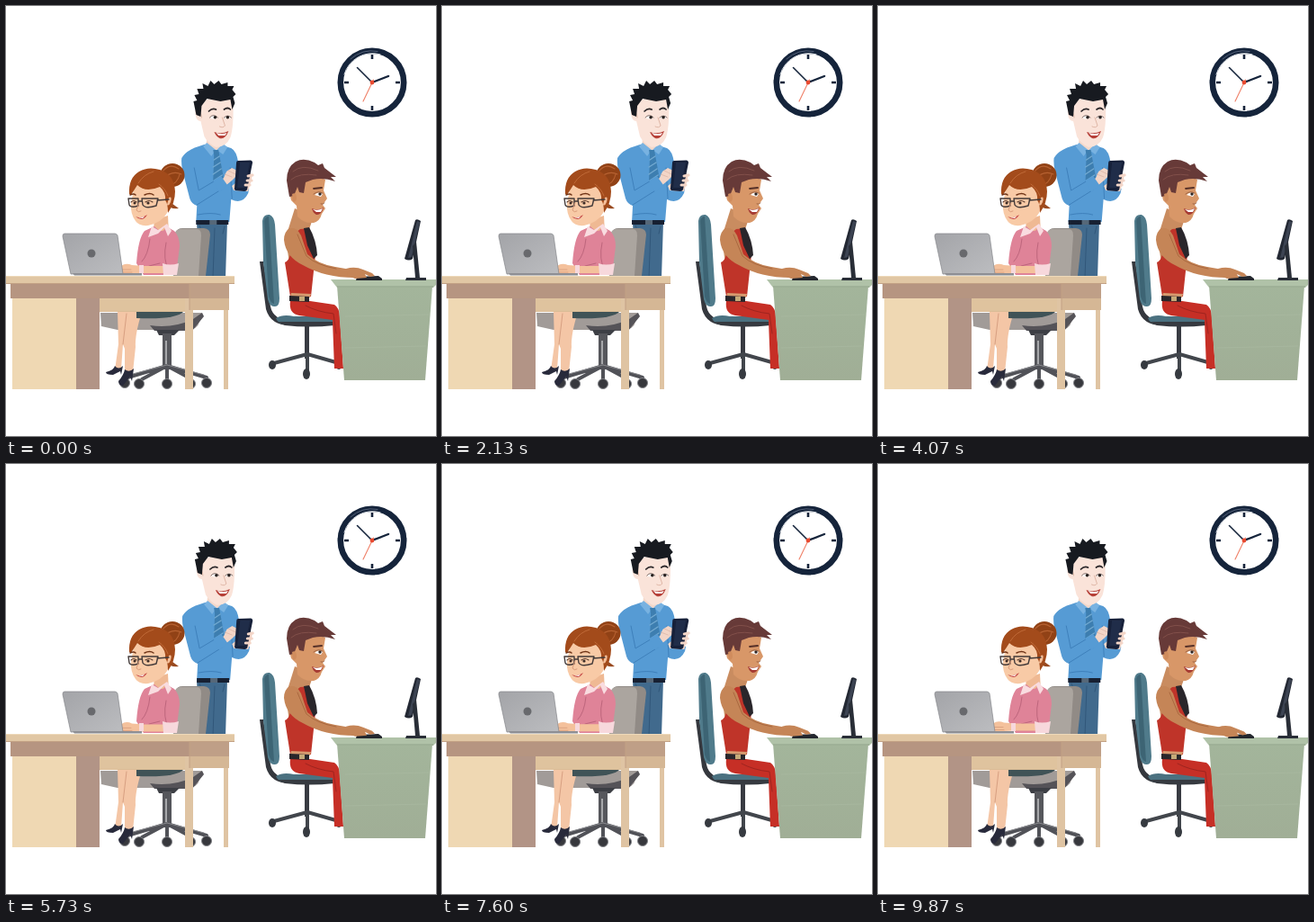
Write an HTML page that moves like this. It is 478x478 px and loops after 9940 ms.

```html
<!DOCTYPE html>
<html lang="en">
<head>
<meta charset="utf-8">
<title>Office at work</title>
<style>
html, body { margin: 0; width: 100%; height: 100%; overflow: hidden; background: #fff }
svg { display: block; width: 100vw; height: 100vh }
.line { fill: none; stroke-linecap: round; stroke-linejoin: round }
</style>
</head>
<body>
<svg viewBox="0 0 478 478">
<defs>
  <linearGradient id="green" x2="0" y2="1"><stop stop-color="#a3b59b"/><stop offset="1" stop-color="#a0ae96"/></linearGradient>
  <linearGradient id="metal" x2="1" y2="1"><stop stop-color="#a3a4a8"/><stop offset="1" stop-color="#bcbdc0"/></linearGradient>
</defs>

<g id="clock" class="line">
  <circle cx="407" cy="85" r="35.2" fill="#fff" stroke="#15243b" stroke-width="6.6"/>
  <path d="M376 76A32.5 32.5 0 0 1 416 53.8" stroke="#dfe3e8" stroke-width="1"/>
  <path d="M383 59A35 35 0 0 1 413 50.5" stroke="#536078" stroke-width="1"/>
  <path d="M407 54v5M407 111v5M376 85h5M433 85h5" stroke="#15243b" stroke-width="2.6" stroke-linecap="butt"/>
  <path d="M407 85L425 78" stroke="#15243b" stroke-width="2.4"/>
  <path d="M407 85L390.500 68.500" stroke="#15243b" stroke-width="1.6"/>
  <path d="M408.500 82L397 106" stroke="#ef8068" stroke-width="1.1"/>
  <circle cx="407" cy="85" r="2.4" fill="#e8492f"/>
</g>

<g id="standing">
  <path d="M212 240H246L244 302H215Z" fill="#416a8d"/>
  <path d="M232 247L230 302M215 244l3 8M243 245l-2 8" class="line" stroke="#31577a"/>
  <g id="torso">
    <path d="M225 153Q201 158 195 169Q194 175 197 187L204 214Q206 220 212 222L211 240H248L250 215Q263 221 269 208L270 203L257 201L258 174Q256 161 250 158L240 155Z" fill="#569bd4"/>
    <path d="M209 180L214 205L234 193M212 221L239 204M249 180L251 214M213 232Q228 229 238 232" class="line" stroke="#3e80bb" stroke-width="1"/>
    <path d="M223 147L241 149L241 159L233 163L222 156Z" fill="#f4d8ca"/>
    <path d="M223 152L233 160L228 167L219 156ZM241 153L234 160L241 165L246 157Z" fill="#78b2e1"/>
    <path d="M230 160L236 160L237 166L242 193L237 201L230 194L231 166Z" fill="#3d7eb0"/>
    <path d="M231 171l6-4M230 179l8-5M230 187l9-6M231 194l9-6" class="line" stroke="#73aad1" stroke-width="1.4"/>
    <path d="M211 238H247V243H211Z" fill="#172032"/>
    <path d="M226 238h8v5h-8z" fill="#566879"/>
  </g>
  <g id="phone">
    <path d="M270 184Q275 187 272 196L269 206L253 205L251 200L260 193Z" fill="#f3d5c7"/>
    <path d="M235 197L242 191L245 184L251 180L259 184L256 189L251 194L240 203Z" fill="#f3d5c7"/>
    <path d="M230 194L239 189L246 199L237 207Z" fill="#569bd4"/>
    <path d="M243 187l8 3M247 183l8 4" class="line" stroke="#d8b2a3" stroke-width=".7"/>
    <path d="M258 172L272 171.500Q274 172 274 174L268 204Q267 206 265 206L255 205Q253 204 254 202L256 174Q256 172 258 172Z" fill="#17213a"/>
    <path d="M260 174L271 174L265 202L257 202Z" fill="#202d49"/>
    <path d="M269 189l5-1M268 194l5 0M266 199l5 0" class="line" stroke="#f3d5c7" stroke-width="3"/>
  </g>
  <g id="head">
    <path d="M214 114Q209 113 210 120Q211 128 216 128L220 145Q224 153 233 157Q244 157 249 146Q253 134 252 105L244 100L222 104Z" fill="#fae3d9"/>
    <path d="M213 117q4 1 4 7" class="line" stroke="#dfb8a7"/>
    <path d="M211 121L208 106L212 105L209 99L214 98L212 92L219 92L218 86L224 89L227 83L231 87L236 83L239 87L246 85L246 89L253 89L251 93L255 98L252 101L254 108L251 115L249 104L238 106L223 103L217 111L216 123Z" fill="#171a20"/>
    <path d="M225 117q4-4 8-2M242 115q4-3 7 0" class="line" stroke="#292528" stroke-width="1.7"/>
    <g id="eyesOpen">
      <path d="M226 124Q230 119 235 124Q230 127 226 124M242 124Q246 119 250 124Q246 126 242 124" fill="#fff"/>
      <path d="M226 124q4-5 9 0M242 124q4-4 8 0" class="line" stroke="#5d4843" stroke-width=".8"/>
      <circle cx="232" cy="123.800" r="1.800" fill="#28211f"/><circle cx="246" cy="123.800" r="1.800" fill="#28211f"/>
    </g>
    <path id="eyesShut" d="M226 124q4 3 9 0M242 124q4 3 8 0" class="line" stroke="#6c4b43" stroke-width="1.1"/>
    <path d="M240 124L243 133Q241 136 237 134" class="line" stroke="#dfb6a6" stroke-width="1"/>
    <path d="M231 140Q239 143 247 139Q243 149 237 147Q233 145 231 140" fill="#b64038"/>
    <path d="M233 141Q240 143 245 141L243 144H236Z" fill="#fff"/>
  </g>
</g>

<g id="chairLeft">
  <path d="M189 252Q190 247 196 247H220Q227 248 227 254L222 300H188Z" fill="#918b86"/>
  <path d="M187 255Q188 248 194 248H212Q217 248 217 255L214 300H186Z" fill="#aba59f"/>
  <path d="M105 341H218L215 351Q213 360 201 360H124L106 356Z" fill="#a19b98"/>
  <path d="M160 355Q185 359 208 348L218 341L220 345L207 361H165Z" fill="#555358"/>
  <path d="M167 360H193L187 366H170Z" fill="#3d3f45"/>
  <path d="M174 364h10v36h-10z" fill="#56575c"/><path d="M177 372h2v28h-2z" fill="#a7a8ab"/>
  <path d="M179 400L135 413M179 400L151 415M179 400V415M179 400L205 414M179 400L223 413" class="line" stroke="#515258" stroke-width="4"/>
  <path d="M179 399L137 410M179 399L220 410" class="line" stroke="#898a8e" stroke-width="1"/>
  <g fill="#37383d" stroke="#818287"><circle cx="132" cy="419" r="5.500"/><circle cx="148" cy="420" r="5.500"/><circle cx="179" cy="420" r="5.500"/><circle cx="205" cy="420" r="5.500"/><circle cx="223" cy="419" r="5.500"/></g>
</g>

<g id="woman">
  <path d="M124 340H151Q143 366 144 379L141 407L132 409L132 381L130 376L128 404L121 405L125 376Z" fill="#f4c6a6"/>
  <path d="M134 342L130 376" class="line" stroke="#d79f81" stroke-width="1"/>
  <path d="M145 339H198Q190 349 145 347Z" fill="#405357"/>
  <path d="M121 400Q120 405 111 407Q111 410 119 410L127 406L128 410L130 400Q125 405 121 400Z" fill="#282a3b"/>
  <path id="foot" d="M132 404Q131 410 125 417Q125 422 130 422L138 412L140 417L142 403Q137 408 132 404Z" fill="#282a3b"/>
  <path d="M165 238L180 233L181 254L163 256Z" fill="#efb993"/>
  <path d="M165 245L154 250Q147 258 145 286L153 299H189L193 267Q193 256 187 250L178 245Q175 255 165 245Z" fill="#df8398"/>
  <path d="M160 259Q158 277 151 284M178 263Q174 282 181 294M159 289L171 286" class="line" stroke="#bd657c"/>
  <path d="M162 245L158 257L169 253L176 246L180 256L184 250L179 242L169 249Z" fill="#f9dce0"/>
  <path d="M187 204l-6 13l11 8q-10 1-12-4Z" fill="#994a20"/>
  <ellipse cx="185" cy="188" rx="13.500" ry="13" fill="#914216"/>
  <path d="M174 184Q182 174 192 181M174 192Q185 182 195 187M181 200Q191 197 193 187" class="line" stroke="#b76232" stroke-width="1.1"/>
  <path d="M143 199L139 219Q138 231 144 239Q148 245 158 244Q173 241 179 230L185 216Q188 211 182 210L181 196Z" fill="#f8caa6"/>
  <path d="M137 209Q136 191 148 184Q158 178 171 182Q187 187 188 206Q188 219 180 230Q180 219 177 216Q178 207 171 201Q155 208 146 199L139 210Z" fill="#a34b1b"/>
  <path d="M147 197Q153 187 164 184M170 198Q177 203 180 211" class="line" stroke="#c06a38"/>
  <path d="M181 213q4-2 2 5q-2 5-4 3" fill="#f5c09b"/>
  <path d="M138 210q4-2 6 0M154 210q6-3 10 0" class="line" stroke="#713517" stroke-width="1.5"/>
  <path d="M139 218q3-3 6 0M155 218q4-3 8 0" class="line" stroke="#53362a" stroke-width="1.1"/>
  <circle cx="143" cy="219" r="1.500" fill="#3b2b26"/><circle cx="158" cy="219" r="1.600" fill="#3b2b26"/>
  <path d="M136 214H147V222Q139 225 137 221ZM151 214H169L167 222Q155 226 152 221ZM147 217h4M168 216l13-1" class="line" stroke="#433a39" stroke-width="1.400"/>
  <path d="M148 219L145 227Q147 230 150 228" class="line" stroke="#d99c7b"/>
  <path d="M144 234Q150 237 157 232Q152 241 144 234" fill="#c74a46"/><path d="M147 235q4 0 7-1l-2 2z" fill="#fff"/>
  <g id="typingLeft">
    <path d="M128 289Q133 285 140 288L153 289L175 289V297H151L129 298Z" fill="#f4c19c"/>
    <path d="M129 293h10M130 296h10" class="line" stroke="#d69c7b" stroke-width=".8"/>
  </g>
  <path d="M174 286Q182 289 192 286L190 299H175Z" fill="#f7d8dc"/>
  <path d="M148 288h5v9h-5z" fill="#f7d8dc"/>
</g>

<g id="deskLeft">
  <path d="M78 325H204V340H78Z" fill="#dabc96"/>
  <path d="M7 325H78V426H7Z" fill="#efd8b3"/>
  <path d="M78 325H104V426H78Z" fill="#b29486"/>
  <path d="M104 325H200V339H104Z" fill="#dfc39e"/>
  <path d="M199 325H208V426H199ZM242 337H247V426H242Z" fill="#dfc4a3"/>
  <path d="M5 308H204V325H5Z" fill="#b69581"/>
  <path d="M204 308H248V338H204Z" fill="#bf9f87"/>
  <path d="M204 325H248V338H204Z" fill="#d5b795"/>
  <path d="M0 300H254V309H0Z" fill="#e1c7a4"/>
  <path d="M0 308.500H254M204 309V338" stroke="#c2a184"/>
  <path d="M0 300.500H254" stroke="#eed9b9"/>
</g>

<g id="laptop">
  <path d="M65 253H121Q123 253 124 255L130 298H72L63 256Q63 253 65 253Z" fill="url(#metal)" stroke="#85868a" stroke-width=".7"/>
  <circle cx="95" cy="275" r="4.500" fill="#68696d"/>
  <path d="M74 297H151V299.500H76Z" fill="#8e8f94"/>
</g>

<g id="chairRight">
  <path d="M282 284L286 284L294 334Q297 349 317 350L316 355Q294 355 289 337Z" fill="#35383e"/>
  <path d="M285 239Q286 231 293 232Q298 234 299 243L304 325Q304 335 298 334Q293 334 291 326L286 285Z" fill="#507b8b"/>
  <path d="M287 239Q288 234 292 234L298 331Q294 330 292 323Z" fill="#3d6474"/>
  <path d="M300 347Q308 342 320 345H365V352Q360 355 312 354Q302 353 300 347Z" fill="#4b7180"/>
  <path d="M303 351H365V355Q337 358 310 355Z" fill="#363a40"/>
  <path d="M332 355h5v37h-5z" fill="#383b42"/>
  <path d="M335 387L298 397M335 387V407M335 387L370 397" class="line" stroke="#42464c" stroke-width="4"/>
  <g fill="#363a40"><ellipse cx="296" cy="399" rx="4" ry="5"/><ellipse cx="334" cy="409" rx="4" ry="6"/><ellipse cx="370" cy="399" rx="4" ry="5"/></g>
</g>

<g id="seated">
  <path d="M316 328H338L365 332Q371 336 371 345L375 403H365L363 349L326 344Q314 342 316 328Z" fill="#c62f26"/>
  <path d="M333 333Q346 340 364 342L367 364" class="line" stroke="#9e241f"/>
  <path d="M321 225L342 234L337 248L343 267L342 286L315 287L311 257Z" fill="#c98c60"/>
  <path d="M316 250Q323 253 327 248L337 247Q344 260 344 276L339 323H316L310 285Q314 284 316 276Z" fill="#bf3429"/>
  <path d="M331 247L337 246Q345 260 346 277L342 281L335 266Z" fill="#29262b"/>
  <path d="M317 319L339 320L338 324L316 323Z" fill="#d69a6f"/>
  <path d="M315 322L337 323V329L315 328Z" fill="#29262b"/><path d="M326 323h6v5h-6z" fill="#c5aa79"/>
  <path d="M315 247Q323 245 328 255L335 276Q347 287 366 290L389 294L388 302Q354 302 330 288Q311 279 309 260Q309 251 315 247Z" fill="#c58557"/>
  <path d="M324 254L334 278Q345 288 367 292" class="line" stroke="#a9683f"/>
  <path d="M320 204Q314 207 317 216L323 222L324 234Q331 242 342 241Q349 239 351 231L355 225L352 221L357 214L353 205L355 193L337 185L322 194Z" fill="#d89768"/>
  <path d="M315 212L312 194Q312 179 322 173Q331 168 343 174L347 177L352 175L354 180L367 190L361 190L366 195Q353 190 341 193L333 196L331 208L326 207L324 201L320 211Z" fill="#673a38"/>
  <path d="M319 184Q329 175 347 183M317 193Q326 185 345 188" class="line" stroke="#82504a"/>
  <path d="M318 209q5-3 5 5q-1 5-4 3" fill="#d08c5d"/>
  <path d="M342 203l9-1" class="line" stroke="#553028" stroke-width="1.800"/>
  <path d="M343 210Q348 205 352 209L350 212Z" fill="#fff"/><circle cx="349" cy="209" r="1.700" fill="#302622"/>
  <path d="M342 209q5-4 10-1M350 220q2 1 4-1" class="line" stroke="#8e5639" stroke-width=".8"/>
  <path d="M340 225Q347 228 353 224Q350 233 345 232Q341 230 340 225" fill="#a63b33"/>
  <path d="M341 226Q347 228 352 225L350 229H345Z" fill="#fff"/>
</g>

<g id="deskRight">
  <path d="M368 311H474L466 416H376Z" fill="url(#green)"/>
  <path d="M361 304H478V310L475 313H368Z" fill="#b0c2a8"/>
  <path d="M368 312H475" stroke="#8d9f86"/>
  <path d="M377 345l93-2M377 380l90-2" stroke="#a9b9a1" stroke-width=".7"/>
  <path d="M455 238Q457 236 461 239L452 281Q448 284 443 281Z" fill="#232833"/>
  <path d="M457 239L460 240L451 279L447 280Z" fill="#3d4453"/>
  <path d="M452 267L456 262L460 302H455Z" fill="#292e37"/>
  <path d="M445 302H467V305H444Z" fill="#292e37"/>
  <path d="M390 301L414 300L418 303V305H389Z" fill="#24272e"/>
  <path id="typingRight" d="M378 292Q388 289 397 293L407 297L410 300L405 301L399 298L401 302L388 303L380 300Z" fill="#c58557"/>
</g>
</svg>
<script>
const LOOP = 9940;
const $ = id => document.getElementById(id);
const move = (id, x, y) => $(id).setAttribute('transform', `translate(${x} ${y})`);

function draw(now) {
  const t = now % LOOP;
  const sway = 1 + Math.cos(2 * Math.PI * (t - 6500) / LOOP);
  const tap = Math.sin(2 * Math.PI * t * 28 / LOOP);
  const blink = Math.abs(t - 3000) < 100;

  move('head', sway, 0);
  move('torso', sway * .6, 0);
  move('phone', sway * .15, 0);
  move('typingLeft', 0, tap * .5);
  move('typingRight', 0, -tap * .4);
  $('eyesOpen').style.display = blink ? 'none' : '';
  $('eyesShut').style.display = blink ? '' : 'none';
  requestAnimationFrame(() => draw(performance.now() - start));
}

const start = performance.now();
draw(0);
</script>
</body>
</html>
```
